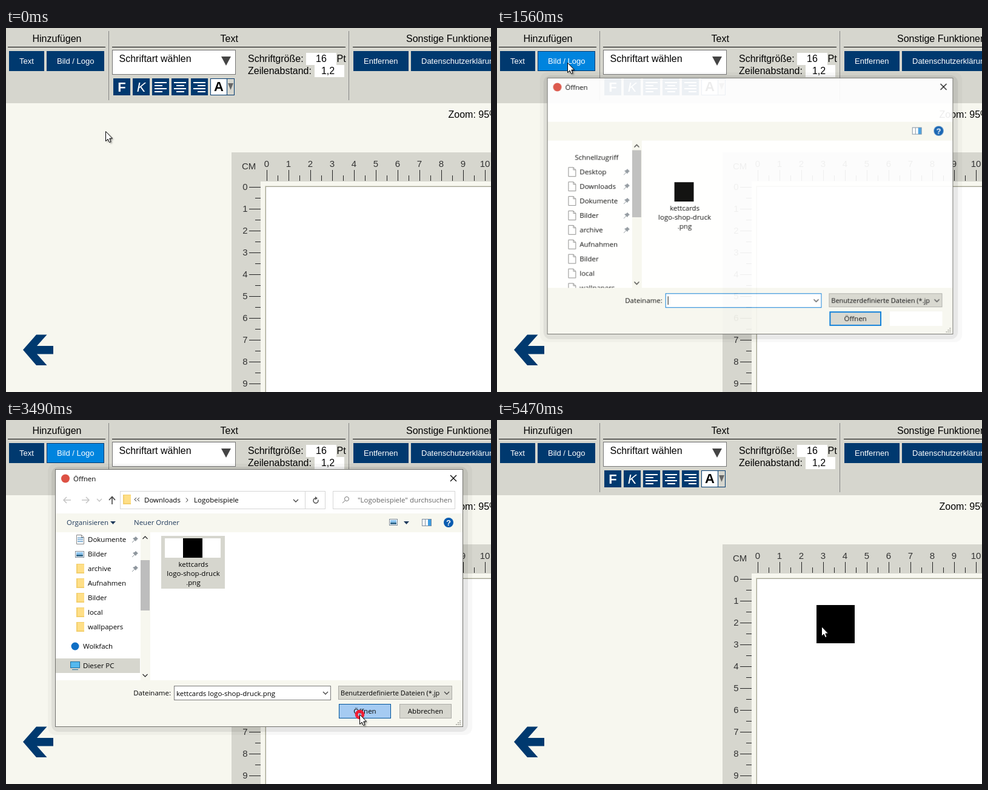
Recreate the animation shown at these times as an HTML page with a canvas. Size 800 by 600 pixels, loop 5530 ms.

```html
<!DOCTYPE html>
<html lang="de">
<head>
<meta charset="utf-8">
<title>Logo hochladen</title>
<style>
html, body { margin: 0; width: 100%; height: 100%; overflow: hidden; background: #f7f7ef; }
canvas { display: block; width: 800px; height: 600px; }
</style>
</head>
<body>
<canvas id="stage" width="800" height="600"></canvas>
<script>
const LOOP = 5530;
const NAVY = '#00396f', GREY = '#d6d6ce', CREAM = '#f7f7ef', BLUE = '#0078d7';
const PAGE_FONT = '"Liberation Sans", Arial, sans-serif';
const UI_FONT = '"Open Sans", sans-serif';

const stage = document.getElementById('stage').getContext('2d');
const layer = document.createElement('canvas');
layer.width = 800;
layer.height = 600;
const dialogCtx = layer.getContext('2d');
let c = stage;

const ramp = (t, from, to) => Math.min(1, Math.max(0, (t - from) / (to - from)));
const between = (t, from, to) => t >= from && t < to;

function box(x, y, w, h, fill, border, line = 1) {
  if (fill) { c.fillStyle = fill; c.fillRect(x, y, w, h); }
  if (border) {
    c.strokeStyle = border;
    c.lineWidth = line;
    c.strokeRect(x + line / 2, y + line / 2, w - line, h - line);
  }
}

function poly(points, fill, stroke, line = 1) {
  c.beginPath();
  points.forEach(([x, y], i) => i ? c.lineTo(x, y) : c.moveTo(x, y));
  if (fill) { c.closePath(); c.fillStyle = fill; c.fill(); }
  if (stroke) { c.strokeStyle = stroke; c.lineWidth = line; c.stroke(); }
}

function disc(x, y, r, fill) {
  c.beginPath();
  c.arc(x, y, r, 0, 7);
  c.fillStyle = fill;
  c.fill();
}

function write(str, x, y, font, fill = '#000', align = 'left') {
  c.font = font;
  c.fillStyle = fill;
  c.textAlign = align;
  c.fillText(str, x, y);
}

const pageText = (str, x, y, size = 16, fill, align, style = '') =>
  write(str, x, y, `${style} ${size}px ${PAGE_FONT}`, fill, align);
const uiText = (str, x, y, fill, align, size = 11.5) =>
  write(str, x, y, `${size}px ${UI_FONT}`, fill, align);
const chevron = (x, y, color = '#444', dir = 1) =>
  poly([[x - 4, y - 2 * dir], [x, y + 2 * dir], [x + 4, y - 2 * dir]], null, color, 1.3);
const triangle = (x, y, w, h, fill) => poly([[x, y], [x + w, y], [x + w / 2, y + h]], fill);

// ---- Web page ----

function navButton(label, x, w, textX, hover = 0) {
  box(x, 38, w, 33, NAVY);
  if (hover) {
    c.globalAlpha = hover;
    box(x, 38, w, 33, '#0084de', NAVY);
    c.globalAlpha = 1;
  }
  pageText(label, textX, 59, 13, '#fff');
}

function drawToolbar(hover) {
  box(0, 0, 800, 124, GREY);
  pageText('Hinzufügen', 43.5, 23);
  pageText('Text', 353.5, 23);
  pageText('Sonstige Funktionen', 660, 23);
  for (const [x, w] of [[3, 161], [175, 385], [572, 228]]) box(x, 31, w, 1, '#000');
  for (const x of [169, 565]) box(x, 5, 1, 114, '#848484');

  navButton('Text', 5, 58, 22);
  navButton('Bild / Logo', 67, 95, 84, hover);
  navButton('Entfernen', 573, 91, 590);
  navButton('Datenschutzerklärung', 668, 150, 685);

  box(175, 36, 204, 41, '#fff', '#777');
  pageText('Schriftart wählen', 186.5, 56);
  triangle(355, 47, 16, 15, '#444');

  for (let i = 0; i < 5; i++) box(177 + 32 * i, 83, 28, 28, NAVY);
  pageText('F', 191, 105, 22, '#fff', 'center', 'bold');
  pageText('K', 223, 105, 22, '#fff', 'center', 'italic');
  [0, 0.5, 1].forEach((side, i) => {
    [20, 13, 20, 13].forEach((w, row) =>
      box(245 + 32 * i + Math.round((20 - w) * side), 89 + 5 * row, w, 2, '#fff'));
  });
  box(337, 83, 40, 28, '#fff', NAVY);
  box(365, 84, 11, 26, GREY);
  box(364, 83, 1, 28, NAVY);
  pageText('A', 351, 104, 22, '#000', 'center', 'bold');
  triangle(366, 91, 9, 11, '#666');

  pageText('Schriftgröße:', 399, 56);
  box(495, 41, 50, 20, '#fff');
  pageText('16', 520, 56, 16, '#000', 'center');
  pageText('Pt', 545.5, 56);
  pageText('Zeilenabstand:', 399, 76);
  box(509, 61, 49, 20, '#fff');
  pageText('1,2', 531, 76, 16, '#000', 'center');
}

function drawRulers() {
  box(372, 205, 428, 48, GREY);
  box(372, 205, 48, 395, GREY);
  pageText('CM', 389, 233, 15, '#333');
  for (let i = 0; i <= 20; i++) {
    const half = i % 2, pos = 18 * i;
    box(430 + pos, half ? 243 : 234, 1, half ? 9 : 18, '#222');
    box(half ? 411 : 401, 262 + pos, half ? 9 : 19, 1, '#222');
    if (!half) {
      pageText(i / 2, 430 + pos, 229, 15, '#333', 'center');
      pageText(i / 2, 398.5, 267 + pos, 15, '#333', 'right');
    }
  }
  box(427, 260, 380, 350, '#d9d9c9');
  box(428, 261, 380, 350, '#a3a394');
  box(429, 262, 380, 350, '#fff');
}

function drawPage(t) {
  box(0, 0, 800, 600, CREAM);
  drawToolbar(ramp(t, 720, 900) * (1 - ramp(t, 4760, 4960)));
  pageText('Zoom: 95%', 729.5, 148);
  drawRulers();
  poly([[28, 530.5], [50, 505.5], [67.5, 505.5], [51, 524], [78, 524], [78, 537.5],
        [51, 537.5], [67.5, 556], [50, 556]], NAVY);
  if (t >= 4700) box(527, 305, 63, 63, '#000');
}

// ---- File dialog ----

function folder(x, y) {
  box(x, y - 8, 13, 16, '#f3cf6d');
  box(x + 2, y - 7, 11, 13, '#ffdf87');
}

function sheet(x, y) {
  poly([[x + .5, y - 7.5], [x + 8.5, y - 7.5], [x + 12.5, y - 3.5], [x + 12.5, y + 7.5],
        [x + .5, y + 7.5], [x + .5, y - 7.5]], '#fff', '#888');
  poly([[x + 8.5, y - 7.5], [x + 8.5, y - 3.5], [x + 12.5, y - 3.5]], null, '#888');
}

function picture(x, y, w = 15) {
  box(x, y - 5, w, 11, '#fff', '#7d8b99');
  box(x + 2, y - 3, w - 4, 7, '#8cc4ee');
  box(x + 2, y + 1, w - 4, 3, '#356a8c');
}

function pin(x, y) {
  poly([[x + 1, y - 5], [x + 5, y - 1], [x + 3, y], [x + 1, y + 3], [x - 4, y - 2], [x - 1, y - 3]], '#8e969d');
  poly([[x - 5, y + 5], [x - 1, y + 1]], null, '#8e969d');
}

const ENTRIES = ['Schnellzugriff', 'Desktop', 'Downloads', 'Dokumente', 'Bilder', 'archive',
  'Aufnahmen', 'Bilder', 'local', 'wallpapers'];

function entryIcon(i, y, loaded) {
  if (!loaded) return sheet(116, y);
  if (i === 4) return picture(114, y);
  if (i > 4) return folder(116, y);
  sheet(116, y);
  for (let k = -3; k < 5; k += 3) box(118, y + k, 9, 1, '#2878b8');
}

function drawSidebar(t) {
  const scrolled = t >= 1800, shift = scrolled ? 88 : 0;
  c.save();
  c.beginPath();
  c.rect(82, 185, 157, 244);
  c.clip();
  ENTRIES.forEach((name, i) => {
    const y = 213 + 24 * i - shift;
    if (i) entryIcon(i, y, t >= 1680);
    uiText(name, i ? 135 : 127, y + 4);
    if (i && i < 6) pin(213, y);
  });
  disc(114, 461 - shift, 6.5, '#0f6fc5');
  uiText('Wolkfach', 127, 465 - shift);
  box(82, 481 - shift, 139, 24, GREY);
  box(106, 486 - shift, 16, 11, '#54b8ee', '#1c6ea0');
  box(109, 499 - shift, 10, 1, '#1c6ea0');
  uiText('Dieser PC', 127, 497 - shift);
  c.restore();

  box(222, 185, 16, 244, CREAM);
  box(222, scrolled ? 231 : 201, 15, scrolled ? 83 : 111, '#bdbdbd');
  chevron(229.5, 194, '#333', -1);
  chevron(229.5, 421, '#333');
}

function drawFile(t) {
  const dy = t < 1650 ? 59 : 0;
  const fill = t >= 3425 ? GREY : t >= 2330 ? '#9fdbf9' : t >= 2130 ? '#d9effc' : null;
  box(256, 191, 105, 87, fill);
  box(262, 195 + dy, 92, 32, '#fff');
  box(292, 195 + dy, 32, 32, '#000');
  ['kettcards', 'logo-shop-druck', '.png'].forEach((line, i) =>
    uiText(line, 309, 242 + dy + 15 * i, '#000', 'center'));
}

function drawNavigation() {
  const arrow = (x, dir, color) => {
    poly([[x - 6, 132], [x + 6, 132]], null, color, 1.4);
    poly([[x + dir, 127], [x + 6 * dir, 132], [x + dir, 137]], null, color, 1.4);
  };
  arrow(101, -1, '#c0c0c0');
  arrow(131, 1, '#c0c0c0');
  chevron(154, 132, '#c0c0c0');
  poly([[175, 139], [175, 127]], null, '#444', 1.6);
  poly([[170, 132], [175, 126.5], [180, 132]], null, '#444', 1.6);

  box(188, 117, 339, 30, '#fff', '#d6d6d6');
  box(493, 117, 1, 30, '#d6d6d6');
  folder(193, 131);
  for (const x of [212, 217]) poly([[x + 3, 128], [x, 131], [x + 3, 134]], null, '#333');
  uiText('Downloads', 228, 136);
  poly([[297, 128.5], [300, 132], [297, 135.5]], null, '#333');
  uiText('Logobeispiele', 310, 136);
  chevron(478, 133);
  c.beginPath();
  c.arc(511, 133, 4, -0.4, 4.6);
  c.strokeStyle = '#555';
  c.lineWidth = 1.5;
  c.stroke();
  poly([[510, 126], [514, 129], [510, 132]], '#555');

  box(539, 117, 202, 30, '#fff', '#d6d6d6');
  c.beginPath();
  c.arc(562, 130, 3.5, 0, 7);
  c.strokeStyle = '#777';
  c.lineWidth = 1;
  c.stroke();
  poly([[559.5, 132.5], [555, 137]], null, '#777');
  uiText('"Logobeispiele" durchsuchen', 580, 136, '#666');

  uiText('Organisieren', 100, 173, '#1e395b');
  triangle(172, 167, 9, 5, '#1e395b');
  uiText('Neuer Ordner', 211, 173, '#1e395b');
  picture(632, 168, 14);
  triangle(656, 167, 9, 5, '#1e395b');
}

function drawDialogFooter(t) {
  const focused = t < 2330;
  uiText('Dateiname:', 272, 454, '#000', 'right');
  box(277, 438, 259, 24, '#fff', focused ? BLUE : '#7a7a7a');
  if (focused) box(281, 443, 1, 14, '#000');
  else uiText('kettcards logo-shop-druck.png', 281, 455);
  chevron(527, 450);
  box(548, 438, 188, 23, GREY, '#adada8');
  uiText('Benutzerdefinierte Dateien (*.jp', 552, 454, '#000', 'left', 11);
  chevron(727, 450);

  const pressed = t >= 3425, hovered = t >= 2880;
  box(549, 468, 86, 24, pressed ? '#a5cbf2' : hovered ? '#d9ebf9' : GREY,
    pressed ? '#00549b' : BLUE, pressed ? 1 : 2);
  uiText('Öffnen', 592, 484, '#000', 'center');
  if (t < 1600) box(649, 468, 87, 24, '#fff');
  else {
    box(649, 468, 86, 24, GREY, '#adada8');
    uiText('Abbrechen', 692, 484, '#000', 'center');
  }
  for (let i = 0; i < 3; i++)
    for (let j = 0; j <= i; j++) box(748 - 3 * j, 495 + 3 * i, 2, 2, '#b5b5ad');
}

function shadow(x, y, w, h, alpha) {
  c.fillStyle = `rgba(0,0,0,${alpha})`;
  c.beginPath();
  c.roundRect(x, y, w, h, 12);
  c.fill();
}

function drawDialog(t) {
  c.clearRect(0, 0, 800, 600);
  shadow(69, 72, 700, 447, 0.03);
  shadow(75, 77, 687, 437, 0.07);
  box(81, 81, 673, 425, '#fff', '#70706c');
  box(82, 154, 671, 31, CREAM);
  box(82, 429, 671, 76, CREAM);
  disc(98, 96.5, 7, '#dd5144');
  uiText('Öffnen', 111, 101);
  poly([[733, 91], [743, 101]], null, '#000', 1.2);
  poly([[743, 91], [733, 101]], null, '#000', 1.2);
  if (t >= 1600) drawNavigation();
  box(686, 163, 16, 12, '#fff', '#7c8da0');
  box(696, 164, 5, 10, '#3d9be0');
  box(691, 164, 1, 10, '#7c8da0');
  disc(730, 169, 8, '#0a5cb0');
  pageText('?', 730, 174, 13, '#fff', 'center', 'bold');
  drawSidebar(t);
  drawFile(t);
  drawDialogFooter(t);
}

function showDialog(t) {
  if (!between(t, 1400, 3740)) return;
  c = dialogCtx;
  drawDialog(t);
  c = stage;
  const opening = ramp(t, 1400, 1590), closing = ramp(t, 3600, 3740);
  const scale = 0.97 + 0.03 * opening - 0.06 * closing;
  c.save();
  c.globalAlpha = (1 - (1 - opening) ** 1.4) * (1 - closing);
  c.translate(417, 293);
  c.scale(scale, scale);
  c.drawImage(layer, -417, -293);
  c.restore();
}

// ---- Pointer ----

const PATH = [
  [0, 164, 170], [129, 164, 170], [130, 160, 159], [159, 160, 159], [160, 156, 148],
  [320, 156, 148], [870, 116, 57], [1600, 116, 57], [2040, 238, 196], [2260, 315, 252],
  [2400, 315, 252], [2620, 359, 342], [2920, 562, 492], [3150, 583, 485], [3770, 583, 485],
  [3970, 471, 316], [4080, 457, 294], [4400, 457, 296], [5200, 535, 340], [LOOP, 535, 340]
];
const CLICKS = [[1000, 117, 55], [2323, 315.5, 251.5], [3425, 583.5, 485.5]];

function pointerAt(t) {
  const i = PATH.findIndex(key => key[0] > t);
  const [t0, x0, y0] = PATH[i - 1], [t1, x1, y1] = PATH[i];
  const p = ramp(t, t0, t1), eased = p * p * (3 - 2 * p);
  return [Math.round(x0 + (x1 - x0) * eased), Math.round(y0 + (y1 - y0) * eased)];
}

function drawClicks(t) {
  for (const [start, x, y] of CLICKS) {
    const p = (t - start) / 560;
    if (p < 0 || p >= 1) continue;
    const outer = 6 + 15.5 * p, inner = 14 * p ** 0.75;
    c.globalAlpha = (1 - p) ** 0.7;
    c.beginPath();
    c.arc(x, y, (outer + inner) / 2, 0, 7);
    c.strokeStyle = '#fa1428';
    c.lineWidth = outer - inner;
    c.stroke();
    c.globalAlpha = 1;
  }
}

function drawPointer(t) {
  const [x, y] = pointerAt(t);
  const shape = [[.5, .5], [.5, 16.5], [4, 13], [6.5, 18.5], [9, 17.5], [6.8, 12], [11.5, 12], [.5, .5]];
  c.save();
  c.translate(x, y);
  c.shadowColor = 'rgba(0,0,0,.45)';
  c.shadowBlur = 3;
  c.shadowOffsetX = c.shadowOffsetY = 2;
  poly(shape, '#fff');
  c.shadowColor = 'transparent';
  poly(shape, null, '#000');
  c.restore();
}

function render(now) {
  const t = now % LOOP;
  drawPage(t);
  showDialog(t);
  drawClicks(t);
  drawPointer(t);
}

let origin;
function tick(now) {
  origin ??= now;
  render(Math.max(0, now - origin));
  requestAnimationFrame(tick);
}
render(0);
requestAnimationFrame(tick);
</script>
</body>
</html>
```
